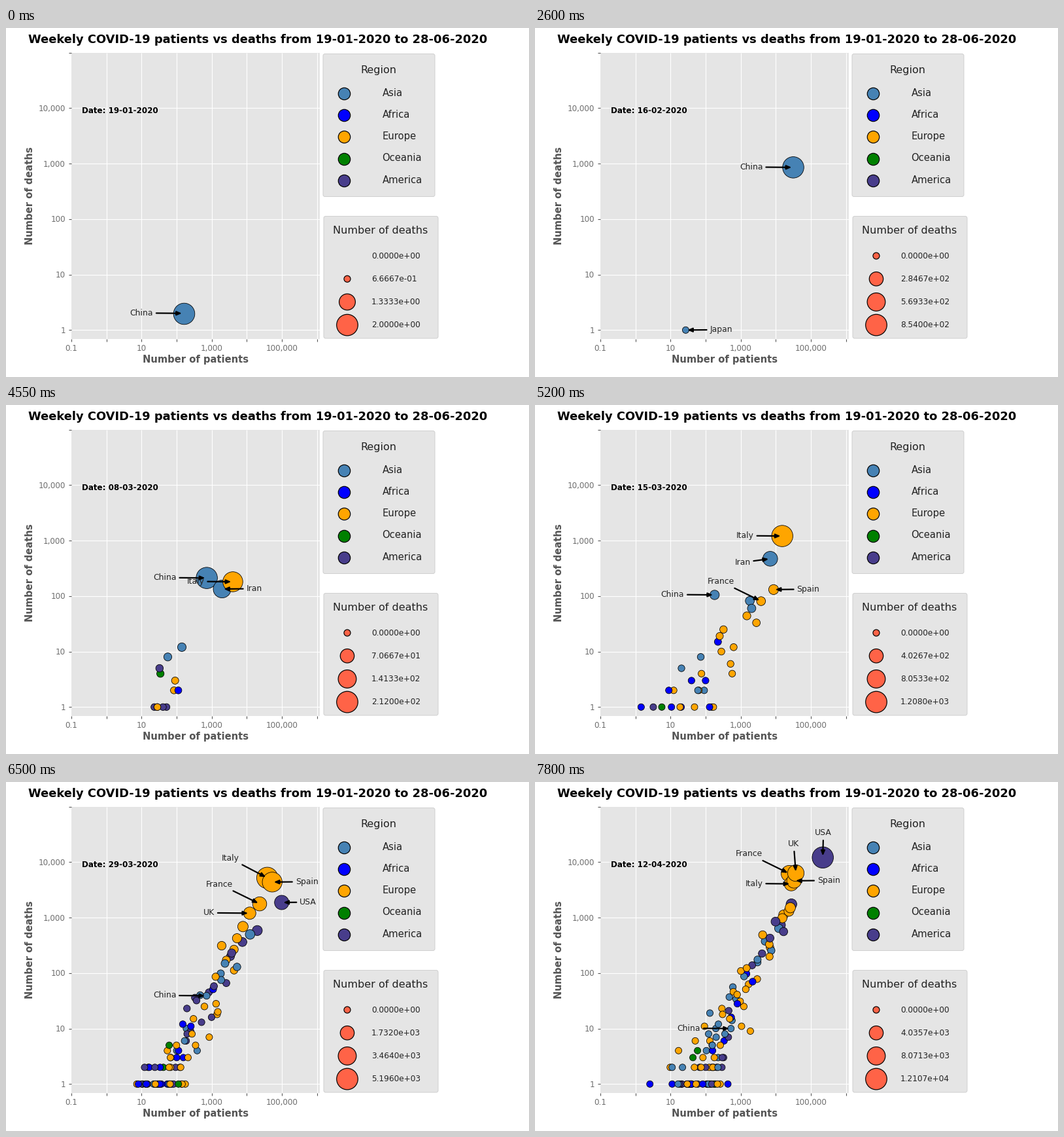
Write a matplotlib script that moves like this. It is 800 by 533 pixels and loops after 8 s.

```python
import matplotlib.pyplot as plt
import numpy as np
from matplotlib.animation import FuncAnimation
from matplotlib.patches import FancyBboxPatch, Rectangle

WIDTH, HEIGHT, DPI = 800, 533, 100
INTERVAL, LOOP, HOLD, WEEKS = 50, 8000, 650, 13
PT = 72 / DPI  # points per pixel
GREY, INK, SOFT, TICK = "#e5e5e5", "#222222", "#555555", "#6e6e6e"
COLORS = {"Asia": "steelblue", "Africa": "blue", "Europe": "orange",
          "Oceania": "green", "America": "darkslateblue"}

# Share of each region among the mildest and the worst outbreaks
MILD = np.array([0.18, 0.30, 0.28, 0.04, 0.20])
SEVERE = np.array([0.25, 0.00, 0.54, 0.01, 0.20])

# Labelled countries: region, label offset, first week, and one key point
# (horizontal position, deaths) every second week
COUNTRIES = {
    "China": ("Asia", (-82, 0), 0,
              [(271.5, 2), (373.3, 248), (395, 854), (339.5, 427),
               (274.7, 105), (306.8, 39), (299.7, 10)]),
    "Philippines": ("Asia", (37, 0), 2, [(170, 1)]),
    "Japan": ("Asia", (37, 0), 4, [(230.5, 1), (262.7, 4)]),
    "South_Korea": ("Asia", (32, 0), 6, [(339.6, 12)]),
    "Iran": ("Asia", (37, 0), 6, [(301.3, 38), (359.8, 470)]),
    "France": ("Europe", (-82, -29.5), 8,
               [(345.8, 81), (388, 1766), (389, 6200)]),
    "Italy": ("Europe", (-70.5, 0), 6,
              [(315.7, 27), (378.2, 1208), (399.7, 5196), (392, 4050)]),
    "Spain": ("Europe", (35.5, 0), 8,
              [(365, 131), (407.2, 4364), (396.3, 4600)]),
    "UK": ("Europe", (-71, 0), 10, [(372.8, 1200), (399, 6330)]),
    "USA": ("America", (27.5, 0), 10, [(421.7, 1870), (440.2, 12107)]),
}
MOVED_LABELS = {("Iran", 8): (-54.5, 6), ("Italy", 10): (-70, -29),
                ("UK", 12): (-12, -44), ("USA", 12): (-12, -37)}

fig = plt.figure(figsize=(WIDTH / DPI, HEIGHT / DPI), dpi=DPI,
                 facecolor="white")
ax = fig.add_axes([0, 0, 1, 1])
ax.set(xlim=(0, WIDTH), ylim=(HEIGHT, 0))
ax.axis("off")


def text(x, y, label, size, color=INK, **style):
    return ax.text(x, y, label, size=size * PT, color=color,
                   family="DejaVu Sans", va="baseline", **style)


def dots(x, y, radius, colors, width, z):
    return ax.scatter(x, y, s=(2 * np.asarray(radius) * PT) ** 2, c=colors,
                      edgecolors="black", linewidths=width * PT, zorder=z)


def line(xs, ys, color):
    ax.plot(xs, ys, color=color, lw=1.1 * PT, solid_capstyle="butt", zorder=1)


def panel(x0, y0, x1, y1):
    ax.add_patch(FancyBboxPatch(
        (x0 + 3, y0 + 3), x1 - x0 - 6, y1 - y0 - 6,
        boxstyle="round,pad=3,rounding_size=3", fc=GREY, ec="#d0d0d0",
        lw=PT))


def deaths_y(deaths):
    return 461.3 - 84.75 * np.log10(deaths)


def radii(values, low, high):
    share = (np.asarray(values) - low) / (high - low)
    area = 25 + 240 * np.sign(share) * np.abs(share) ** 0.9
    return np.sqrt(np.maximum(area, 0))


def date_of(week):
    day, month = 19 + 7 * week, 1
    for length in (31, 29, 31):
        if day <= length:
            break
        day, month = day - length, month + 1
    return f"{day:02d}-{month:02d}-2020"


def labelled(week):
    """Countries with a label this week: name, position, deaths, region."""
    found = []
    for name, (region, _, start, points) in COUNTRIES.items():
        step = (week - start) / 2
        if 0 <= step <= len(points) - 1:
            xs, deaths = np.array(points).T
            keys = range(len(points))
            level = np.interp(step, keys, np.log10(deaths))
            found.append((name, np.interp(step, keys, xs),
                          round(10 ** level), region))
    return found


def outbreaks(week):
    """Unlabelled countries: a cloud that grows along the diagonal."""
    rng = np.random.default_rng(week)
    count = int(115 / (1 + np.exp(1.1 * (8.9 - week))))
    top = 3.6 * (1 - np.exp(-0.4 * max(week - 6, 0)))
    cloud = []
    for u in (np.arange(count) + 0.5) / max(count, 1):
        level = top * u ** 2.2
        x = 240 + 46 * level + rng.normal(0, 34 / (1 + level))
        region = rng.choice(list(COLORS), p=MILD * (1 - u) + SEVERE * u)
        cloud.append((max(x, 154), round(10 ** level), region))
    rng.shuffle(cloud)
    return [(float(x), int(deaths), region) for x, deaths, region in cloud]


def draw_stage():
    text(385, 23, "Weekely COVID-19 patients vs deaths from "
         "19-01-2020 to 28-06-2020", 17.87, "black", weight="bold",
         ha="center")
    ax.add_patch(Rectangle((100, 38), 380, 436.5, fc=GREY, lw=0, zorder=0))
    for i in range(8):
        x = 99.9 + 53.7 * i
        if i:
            line([x, x], [38, 474.5], "white")
        line([x, x], [475, 479], SOFT)
    for i in range(6):
        y = max(deaths_y(10 ** i), 38)
        if i < 5:
            line([100, 480], [y, y], "white")
            text(91, y + 4.7, f"{10 ** i:,}", 12, TICK, ha="right")
        line([96, 100], [y, y], SOFT)
    for i, label in enumerate(["0.1", "10", "1,000", "100,000"]):
        text(100 + 107.44 * i, 493, label, 12, TICK, ha="center")
    text(290, 511, "Number of patients", 14.8, SOFT, weight="bold",
         ha="center")
    text(41.5, 256, "Number of deaths", 14.8, SOFT, weight="bold",
         ha="center", rotation=90, rotation_mode="anchor")

    panel(485, 39.5, 656, 257.5)
    text(569.5, 69, "Region", 16, ha="center")
    for i, (name, color) in enumerate(COLORS.items()):
        dots([516.6], [99.8 + 33.3 * i], [9.2], [color], 1.2, 2)
        text(575.5, 103.5 + 33.3 * i, name, 14.7)
    panel(486, 287.5, 661, 474)
    text(573, 314, "Number of deaths", 16, ha="center")


def draw_label(name, x, deaths, offset):
    y, (dx, dy) = deaths_y(deaths), offset
    return ax.annotate(
        name, (x, y), (x + dx, y + dy + 3), size=12.4 * PT, color=INK,
        family="DejaVu Sans", va="baseline", zorder=5,
        arrowprops=dict(arrowstyle="-|>,head_length=6,head_width=2.5",
                        mutation_scale=PT, color="black", lw=2.2 * PT,
                        shrinkA=1.5, shrinkB=1.8))


def draw_week(week):
    named = labelled(week)
    rows = outbreaks(week) + [row[1:] for row in named]
    xs, deaths, regions = zip(*rows)
    high = max(deaths)
    low = high / 3 if len(rows) == 1 else 0

    group = [
        dots(xs, deaths_y(deaths), radii(deaths, low, high),
             [COLORS[region] for region in regions], 0.8, 3),
        text(116, 130.5, f"Date: {date_of(week)}", 11.85, "black",
             weight="bold")]

    steps = np.linspace(0, high, 4)
    ys = 348 + 35.2 * np.arange(4)
    group.append(dots([522] * 4, ys, radii(steps, low, high), ["tomato"] * 4,
                      1.2, 2))
    group += [text(559, y + 3.5, f"{v:.4e}", 12.1) for y, v in zip(ys, steps)]

    for name, x, count, _ in named:
        offset = MOVED_LABELS.get((name, week), COUNTRIES[name][1])
        group.append(draw_label(name, x, count, offset))
    return group


draw_stage()
weeks = [draw_week(week) for week in range(WEEKS)]


def update(frame):
    current = frame * INTERVAL // HOLD
    for week, group in enumerate(weeks):
        for artist in group:
            artist.set_visible(week == current)
    return []


animation = FuncAnimation(fig, update, frames=LOOP // INTERVAL,
                          interval=INTERVAL, repeat=True, repeat_delay=0)
plt.show()
```
